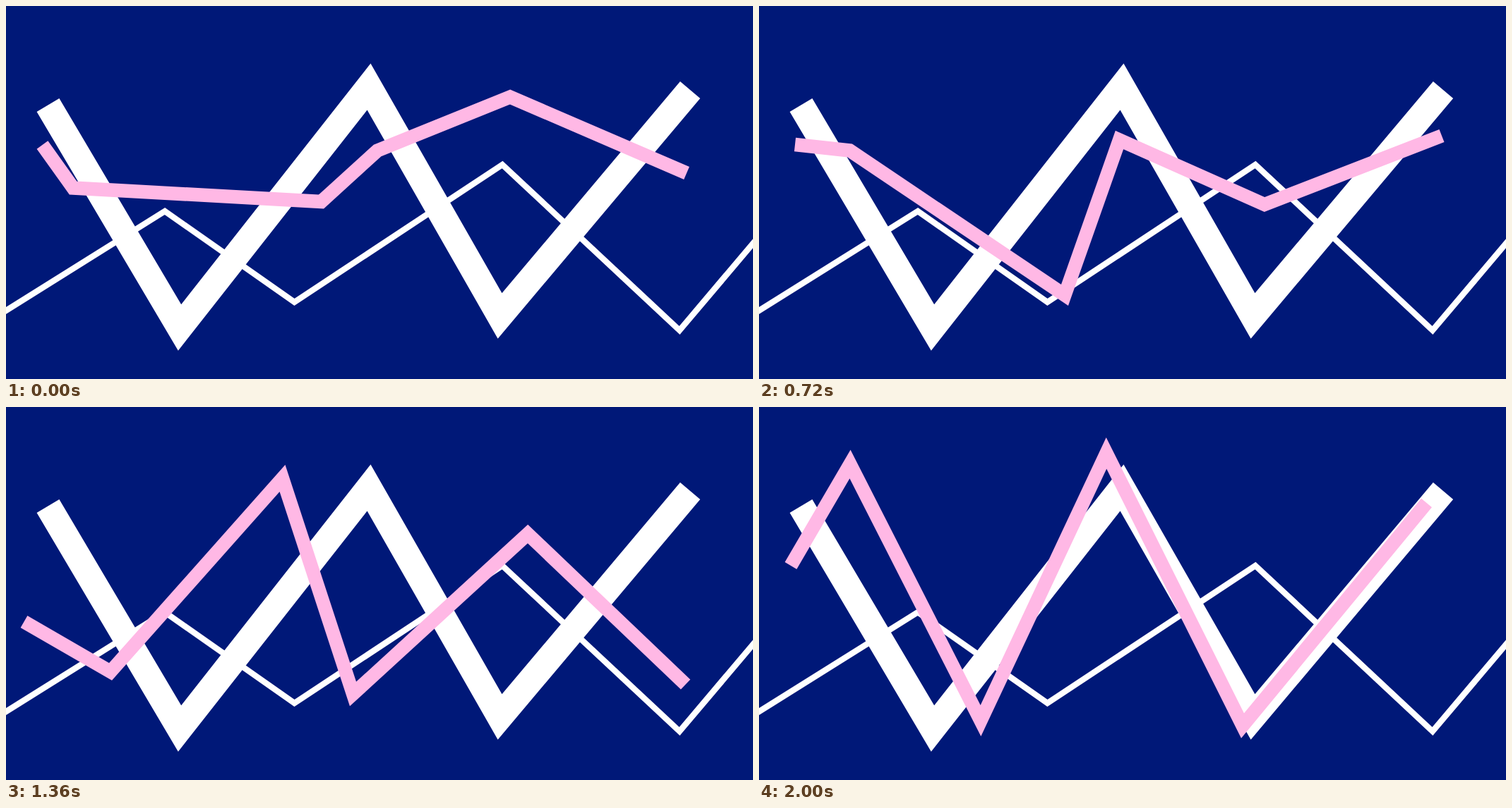
An HTML page that plays this animation: 1058 by 529 pixels, repeating every 2.64 s.

```html
<!DOCTYPE html>
<html lang="en">
<head>
<meta charset="utf-8">
<title>Zigzag lines</title>
<style>
  html, body { margin: 0; width: 100%; height: 100%; overflow: hidden; background: #001878; }
  svg { display: block; width: 100%; height: 100%; }
  polyline { fill: none; stroke: #fff; stroke-miterlimit: 10; }
  #thin { stroke-width: 8.4; }
  #thick { stroke-width: 37; }
  #pink { stroke: #ffb8e5; stroke-width: 19.4; }
</style>
</head>
<body>
<svg viewBox="0 0 1058 529">
  <polyline id="thin" points="-20,444.5 225,291 408.5,420 703,225 954,460 1078,313"/>
  <polyline id="thick" points="59.5,140.5 246,456 514,114.5 699.5,439.5 969,119"/>
  <polyline id="pink"/>
</svg>
<script>
  const HOLD = 640, LEAD = 80;
  // Corner points of the pink line, one pose per beat.
  const poses = [
    "51.5,197 95,258 446.5,277.5 526,205 714,129 964,237",
    "51,196.5 128.5,205 433,410 510.5,190 716,281.5 967,184",
    "25.5,304.5 148,375.5 391.5,101 491.5,407 739,180 962.5,393.5",
    "45,225 129,81 314,445 492,65.5 685,452 945.5,136"
  ];
  const loop = LEAD + HOLD * poses.length;
  const pink = document.getElementById("pink");
  const start = performance.now();

  function draw() {
    const time = (performance.now() - start) % loop;
    const beat = Math.max(0, Math.floor((time - LEAD) / HOLD));
    pink.setAttribute("points", poses[beat]);
    requestAnimationFrame(draw);
  }
  draw();
</script>
</body>
</html>
```
